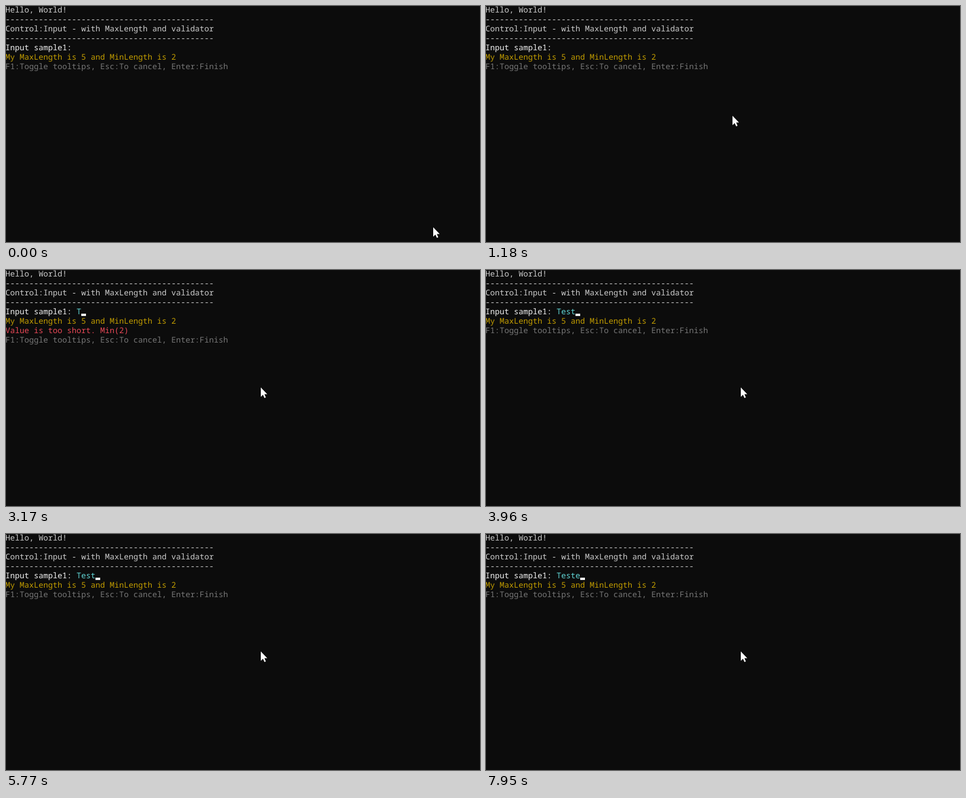
An HTML page for the animation above (8 s loop, 800 by 400 pixels).

```html
<!DOCTYPE html>
<html lang="en">
<head>
<meta charset="utf-8">
<title>Console input</title>
<style>
  html, body { margin: 0; width: 100%; height: 100%; overflow: hidden; background: #0c0c0c; }
  svg { display: block; width: 800px; height: 400px; }
  text { font: 13.3333px "Noto Sans Mono", monospace; text-rendering: geometricPrecision; fill: #ccc; }
  .prompt { fill: #f2f2f2; }
  .answer { fill: #61d6d6; }
  .hint { fill: #c19c00; }
  .error { fill: #e74856; }
  .keys { fill: #767676; }
  #caret { fill: #f2f2f2; }
  #mouse { fill: #fff; stroke: #000; stroke-width: 1; paint-order: stroke; animation: move 8s step-end infinite; }
  @keyframes move {
    0% { transform: translate(721px, 375px); }
    2.375% { transform: translate(203px, 70px); }
    12.25% { transform: translate(359px, 154px); }
    14.75% { transform: translate(416px, 186px); }
    19.75%, 100% { transform: translate(430px, 199px); }
  }
</style>
</head>
<body>
<svg viewBox="0 0 800 400">
  <rect width="800" height="400" fill="#0c0c0c"/>
  <g id="screen"></g>
  <rect id="caret" y="74" width="8" height="4"/>
  <path id="mouse" d="M0 0V16L3.7 12.6L6.2 18L8.6 17L6.2 11.6H11Z"/>
</svg>
<script>
  const LOOP = 8000, CELL = 8, ROW = 16, LEFT = -1, BASELINE = 11;
  const screen = document.getElementById('screen');
  const caret = document.getElementById('caret');
  const mouse = document.getElementById('mouse');

  function addLine(row, content, style = '', column = 0) {
    const line = document.createElementNS('http://www.w3.org/2000/svg', 'text');
    line.setAttribute('x', LEFT + column * CELL);
    line.setAttribute('y', BASELINE + row * ROW);
    line.setAttribute('class', style);
    line.textContent = content;
    screen.append(line);
    return line;
  }

  const prompt = 'Input sample1: ';
  const rule = '-'.repeat(44);
  addLine(0, 'Hello, World!');
  addLine(1, rule);
  addLine(2, 'Control:Input - with MaxLength and validator');
  addLine(3, rule);
  addLine(4, prompt, 'prompt');
  const answer = addLine(4, '', 'answer', prompt.length);
  addLine(5, 'My MaxLength is 5 and MinLength is 2', 'hint');
  const error = addLine(6, '', 'error');
  const keys = addLine(6, 'F1:Toggle tooltips, Esc:To cancel, Enter:Finish', 'keys');

  // [start in ms, typed value, caret visible]
  const states = [
    [0, '', false], [390, '', true], [780, '', false], [1580, '', true],
    [2170, '', false], [2570, '', true], [2770, 'T', false], [3170, 'T', true],
    [3570, 'Te', true], [3760, 'Tes', true], [3960, 'Test', true], [4160, 'Test', false],
    [4780, 'Test', true], [5170, 'Test', false], [5770, 'Test', true], [6360, 'Test', false],
    [6760, 'Testt', true], [7550, 'Test', true], [7950, 'Teste', true]
  ];

  let shown;
  function show(state) {
    if (state === shown) return;
    shown = state;
    const [, value, caretOn] = state;
    const tooShort = value.length === 1;
    answer.textContent = value;
    error.textContent = tooShort ? 'Value is too short. Min(2)' : '';
    keys.setAttribute('y', BASELINE + (tooShort ? 7 : 6) * ROW);
    caret.setAttribute('x', LEFT + (prompt.length + value.length) * CELL);
    caret.setAttribute('visibility', caretOn ? 'visible' : 'hidden');
  }

  const pointer = mouse.getAnimations()[0];
  const start = performance.now();
  function tick() {
    const time = (performance.now() - start) % LOOP;
    if (pointer) pointer.currentTime = time;
    show(states.findLast(([from]) => from <= time));
    requestAnimationFrame(tick);
  }
  tick();
</script>
</body>
</html>
```
